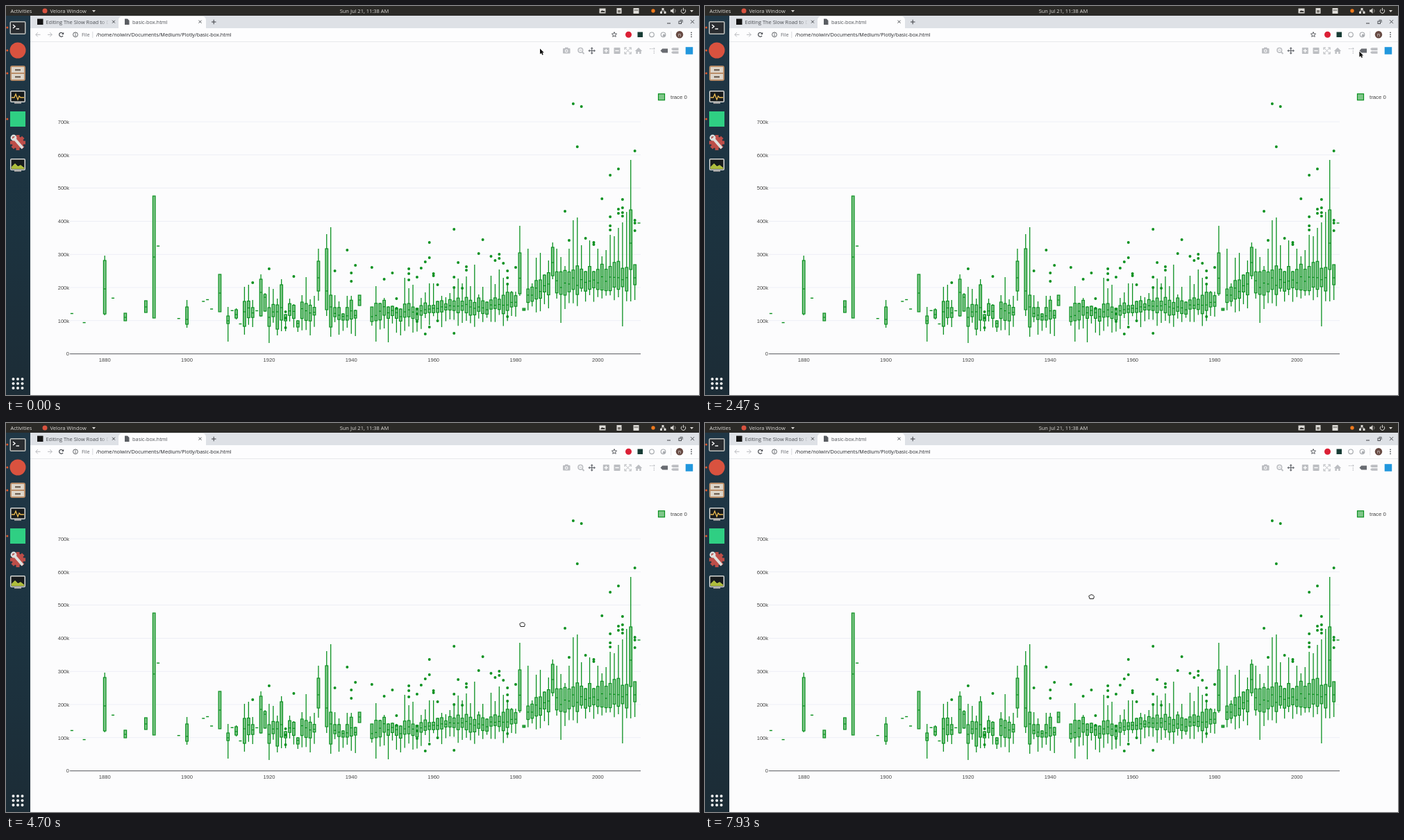
These frames come from a looping animation (998x561 px, 8 s). An HTML page with a canvas:

```html
<!DOCTYPE html>
<html lang="en">
<head>
<meta charset="utf-8">
<title>Box plot hover</title>
<style>
  html, body { margin: 0; width: 100%; height: 100%; overflow: hidden; background: #fcfcfd; }
  canvas { display: block; width: 998px; height: 561px; }
</style>
</head>
<body>
<canvas id="stage"></canvas>
<script>
const W = 998, H = 561, LOOP = 8000;
const GREEN = '#0b9120', PALE = '#7fc689';
const UI = '"Open Sans", "Noto Sans", sans-serif', PLOT = '"Liberation Sans", Arial, sans-serif';
const canvas = document.getElementById('stage');
const screenCtx = canvas.getContext('2d');
const ratio = window.devicePixelRatio || 1;
const backdrop = document.createElement('canvas');
for (const c of [canvas, backdrop]) { c.width = W * ratio; c.height = H * ratio; }
let g = backdrop.getContext('2d');
g.scale(ratio, ratio);
screenCtx.scale(ratio, ratio);

// ---- drawing helpers ----
function rect(x, y, w, h, color) { g.fillStyle = color; g.fillRect(x, y, w, h); }
function round(x, y, w, h, r, color) {
  g.fillStyle = color; g.beginPath(); g.roundRect(x, y, w, h, r); g.fill();
}
function frame(x, y, w, h, color, width = 1) {
  g.strokeStyle = color; g.lineWidth = width; g.strokeRect(x, y, w, h);
}
function dot(x, y, r, color) {
  g.fillStyle = color; g.beginPath(); g.arc(x, y, r, 0, 7); g.fill();
}
function ring(x, y, r, color, width = 1) {
  g.strokeStyle = color; g.lineWidth = width; g.beginPath(); g.arc(x, y, r, 0, 7); g.stroke();
}
function line(color, width, ...points) {
  g.strokeStyle = color; g.lineWidth = width; g.beginPath();
  for (let i = 0; i < points.length; i += 2) g.lineTo(points[i], points[i + 1]);
  g.stroke();
}
function poly(color, ...points) {
  g.fillStyle = color; g.beginPath();
  for (let i = 0; i < points.length; i += 2) g.lineTo(points[i], points[i + 1]);
  g.fill();
}
function text(str, x, y, size, color, font = UI, align = 'left', weight = '') {
  g.font = `${weight} ${size}px ${font}`;
  g.textAlign = align; g.fillStyle = color; g.fillText(str, x, y);
}
function cross(x, y, r, color) {
  line(color, 1, x - r, y - r, x + r, y + r);
  line(color, 1, x + r, y - r, x - r, y + r);
}
function interpolate(points, at) {
  let i = 1;
  while (i < points.length - 1 && points[i][0] < at) i++;
  const a = points[i - 1], b = points[i];
  const k = Math.min(1, Math.max(0, (at - a[0]) / (b[0] - a[0])));
  return a.slice(1).map((v, n) => v + (b[n + 1] - v) * k);
}
let seed = 11;
function random() { seed = (seed * 16807) % 2147483647; return seed / 2147483647; }

// ---- desktop and browser ----
function drawTopBar() {
  rect(0, 0, W, 14, '#2b2a27');
  const ink = '#dedcd8';
  text('Activities', 6.5, 10, 7.5, ink);
  dot(56, 7, 3.5, '#d9523f');
  text('Velora Window', 63.5, 10, 7.5, ink);
  poly(ink, 124, 6, 129, 6, 126.5, 9);
  text('Sun Jul 21, 11:38 AM', 516, 10, 7.5, ink, UI, 'center');
  rect(854.5, 3.5, 9, 7, ink);
  poly('#2b2a27', 856, 9, 858.5, 6, 860, 7.5, 861, 6.5, 863, 9);
  rect(879.5, 3, 7, 8, ink);
  rect(881, 6, 4, 3.5, '#77746e');
  rect(903.5, 3, 8, 8, ink);
  rect(904.5, 5.5, 6, 1, '#55524d');
  dot(932, 7, 2.7, '#f07a1c');
  rect(944.5, 3, 3, 3, ink); rect(942, 8, 3, 3, ink); rect(947.5, 8, 3, 3, ink);
  line(ink, 0.8, 943.5, 8, 943.5, 7, 949, 7, 949, 8);
  poly(ink, 957, 5.5, 959, 5.5, 961.5, 3, 961.5, 11, 959, 8.5, 957, 8.5);
  line('#96938d', 0.9, 963, 4.5, 964.3, 7, 963, 9.5);
  g.strokeStyle = ink; g.lineWidth = 1; g.beginPath(); g.arc(975.5, 7.3, 3.2, -0.9, 4.1); g.stroke();
  line(ink, 1, 975.5, 2.8, 975.5, 7);
  poly(ink, 985, 6, 990, 6, 987.5, 9);
}

function screenIcon(y, color, ...wave) {
  round(6, y - 9, 22, 17, 2, '#d8d9d6');
  rect(7.5, y - 7.5, 19, 14, '#171b1d');
  rect(12, y + 8, 10, 2, '#999');
  line(color, 1.3, ...wave.map((v, i) => i % 2 ? y + v : v));
}

function drawDock() {
  const shade = g.createLinearGradient(0, 14, 0, H);
  shade.addColorStop(0, '#203746');
  shade.addColorStop(0.55, '#1c3340');
  shade.addColorStop(1, '#1c2c36');
  rect(0, 14, 35, H - 14, shade);
  for (const y of [31, 64, 97, 163]) dot(1.8, y, 1.5, '#e1582b');

  round(5.5, 22, 23, 19, 2, '#bfc1be');
  rect(7, 23.5, 20, 16, '#292c30');
  line('#fff', 1.4, 10, 27, 13, 29.5, 10, 32);
  line('#fff', 1.4, 14.5, 33, 19, 33);

  dot(17, 64, 11.5, '#d9523f');

  round(6, 86, 22, 22, 3, '#b98d68');
  rect(8, 88, 18, 8, '#ded6ca'); rect(8, 98, 18, 8, '#ded6ca');
  rect(13, 91, 8, 2.5, '#77695c'); rect(13, 101, 8, 2.5, '#77695c');

  screenIcon(131, '#eabb52', 8, 1, 12, 1, 14, -4, 17, 4, 19, -1, 21, 1, 26, 1);
  rect(6, 152, 22, 22, '#2fcf83');

  for (let i = 0; i < 8; i++) {
    const a = i * Math.PI / 4;
    line('#bd4e49', 5, 17, 197, 17 + 11 * Math.cos(a), 197 + 11 * Math.sin(a));
  }
  dot(17, 197, 8.5, '#bd4e49');
  line('#dedfdd', 4, 11, 190, 24, 205);
  ring(11, 190, 3.2, '#dedfdd', 2.4);

  screenIcon(229, '#c6d14b', 8, 4, 13, -1, 17, 3, 21, 1, 26, 5);
  poly('#aebc3c', 8, 235, 8, 232, 13, 228, 17, 232, 21, 230, 26, 234, 26, 235);
  for (const x of [10.5, 17, 23.5]) for (const y of [538, 544.5, 551]) dot(x, y, 2, '#f1f2f2');
}

function drawBrowser() {
  rect(35, 14, W - 35, 18, '#dee1e6');
  round(162, 15, 126, 19, [5, 5, 0, 0], '#fdfdfe');
  rect(35, 32, W - 35, 19, '#fdfdfe');
  rect(35, 51, W - 35, 0.7, '#dfe1e5');
  const ink = '#4b4e53';

  rect(45, 18.5, 8.5, 8.5, '#151515');
  g.save();
  g.beginPath(); g.rect(56, 15, 92, 17); g.clip();
  const fade = g.createLinearGradient(136, 0, 148, 0);
  fade.addColorStop(0, ink);
  fade.addColorStop(1, '#dee1e6');
  text('Editing The Slow Road to Drawing', 57.5, 25.5, 7.4, fade);
  g.restore();
  cross(155, 22.7, 2, ink);
  poly('#5a5d62', 171, 18.5, 175, 18.5, 177.5, 21, 177.5, 27, 171, 27);
  text('basic-box.html', 182, 25.5, 7.4, ink);
  cross(279.5, 22.7, 2, ink);
  line(ink, 1.1, 296, 23, 302.5, 23);
  line(ink, 1.1, 299.2, 19.7, 299.2, 26.3);
  line(ink, 1.1, 952, 25, 957, 25);
  frame(969, 22, 3.5, 3.5, ink);
  line(ink, 0.9, 970.5, 20.3, 974.2, 20.3, 974.2, 24);
  cross(988.5, 22.7, 2.5, ink);

  for (const [x, way] of [[46, 1], [63, -1]]) {
    line('#b9bbbf', 1, x - 3, 41.3, x + 3.5, 41.3);
    line('#b9bbbf', 1, x + way * -0.2, 38.2, x - way * 3.2, 41.3, x + way * -0.2, 44.4);
  }
  g.strokeStyle = ink; g.lineWidth = 1.2; g.beginPath(); g.arc(79.5, 41.3, 2.9, 0.5, 5.6); g.stroke();
  poly(ink, 83.2, 37.8, 83.2, 41, 80, 41);
  ring(100, 41.3, 3.4, ink, 0.9);
  rect(99.5, 40.8, 1, 2.4, ink); rect(99.5, 39, 1, 1, ink);
  text('File', 109, 44, 7.3, '#66696e');
  rect(124.5, 37, 0.7, 9, '#c9cbcf');
  text('/home/nolwin/Documents/Medium/Plotly/basic-box.html', 130, 44, 7.3, '#222428');

  const star = [];
  for (let i = 0; i < 11; i++) {
    const a = -Math.PI / 2 + i * Math.PI / 5, r = i % 2 ? 1.7 : 3.8;
    star.push(876 + r * Math.cos(a), 41.3 + r * Math.sin(a));
  }
  line(ink, 0.9, ...star);
  dot(896.5, 41.3, 4.5, '#db1f35');
  rect(909.5, 37.5, 7.5, 7.5, '#173c35');
  ring(930, 41.3, 3.3, '#a7aaae', 1.2);
  ring(946.5, 41.3, 3.3, '#a7aaae', 1.2);
  dot(947.5, 42.3, 1.7, '#a7aaae');
  rect(957.5, 36.5, 0.7, 10, '#d5d7da');
  dot(970, 41.3, 5.2, '#674a43');
  text('n', 970, 43.6, 6.5, '#fff', UI, 'center');
  for (const y of [38.3, 41.3, 44.3]) dot(987, y, 0.9, ink);
}

function drawModebar() {
  const soft = '#bcbec2', dark = '#686b71', paper = '#fcfcfd';
  round(802, 61, 10.5, 7.5, 1, soft); rect(805, 59.7, 4.5, 2, soft);
  dot(807.2, 64.8, 2.3, paper); dot(807.2, 64.8, 1.3, soft);
  ring(827.3, 63.8, 3.3, soft, 1.6); line(soft, 1.8, 829.5, 66, 832.5, 69);
  rect(825.7, 63.3, 3.2, 1, soft);
  line(dark, 1.2, 839.5, 64.5, 848, 64.5); line(dark, 1.2, 843.7, 60, 843.7, 69);
  for (let i = 0; i < 4; i++) {
    g.save(); g.translate(843.7, 64.5); g.rotate(i * Math.PI / 2);
    poly(dark, 5.3, 0, 3, -2, 3, 2); g.restore();
  }
  for (const x of [864.3, 880]) {
    round(x - 4.5, 60, 9, 9, 0.8, soft);
    rect(x - 2.7, 63.8, 5.4, 1.4, paper);
  }
  rect(863.6, 61.8, 1.4, 5.4, paper);
  cross(895.6, 64.5, 3.2, soft);
  for (const sx of [-1, 1]) for (const sy of [-1, 1]) {
    const x = 895.6 + sx * 4.5, y = 64.5 + sy * 4.3;
    line(soft, 1.3, x - sx * 2.8, y, x, y, x, y - sy * 2.8);
  }
  poly(soft, 905.8, 65, 911, 60, 916.2, 65, 914.6, 65, 914.6, 69, 912.2, 69, 912.2, 66, 909.8, 66, 909.8, 69, 907.4, 69, 907.4, 65);
  for (const x of [927, 929.7]) rect(x, 61, 1.5, 1.2, soft);
  rect(932.3, 60.5, 2, 2, soft);
  for (const y of [64.3, 67]) rect(932.7, y, 1.2, 1.6, soft);
  poly(dark, 942.5, 64.5, 945.3, 61.5, 953, 61.5, 953, 67.5, 945.3, 67.5);
  for (const y of [60.3, 65.2]) poly(soft, 958, y + 1.8, 960, y, 968.5, y, 968.5, y + 3.6, 960, y + 3.6);
  rect(978.7, 59.2, 10.5, 10.5, '#2197dd');
}

// ---- box plot: values are heights on the stage ----
const yearX = year => 142.2 + (year - 1880) * 5.918;
const singles = { 1872: 443.5, 1875: 456.6, 1882: 421.3, 1893: 346.2, 1898: 450.7, 1904: 426,
  1905: 423.5, 1906: 437, 1911: 439.3, 1913: 458.5, 1917: 439.5, 2010: 313 };
// year: upper whisker, q3, median, q1, lower whisker
const boxes = {
  1880: [360, 367, 408, 444, 446], 1885: [443, 443, 449, 454, 454], 1890: [425, 425, 434, 442, 442],
  1892: [274, 274, 362, 450, 450], 1900: [424, 434, 452, 459, 464], 1908: [387, 387, 414, 441, 441],
  1910: [434, 447, 454, 458, 484], 1912: [436, 438, 445, 450, 452], 1914: [405, 426, 441, 462, 474],
  1918: [387, 394, 413, 447, 448], 1919: [414, 416, 420, 440, 441], 1920: [405, 435, 449, 462, 486],
  1922: [422, 431, 441, 466, 475], 1923: [394, 402, 435, 453, 469], 1932: [350, 368, 392, 411, 425],
  1934: [329, 350, 411, 438, 447], 1935: [319, 417, 434, 463, 477], 1942: [417, 417, 424, 432, 432],
  1945: [434, 434, 448, 455, 461], 1981: [317, 356, 392.5, 415, 418], 1982: [436, 436, 438, 439, 439],
  1989: [341, 348, 370, 389, 394], 2008: [222, 294, 342, 380, 426], 2009: [373, 373, 392, 402, 424]
};
// upper whiskers of consecutive years; the boxes below them follow the trend
const peaks = {
  1915: [402, 424], 1921: [408], 1924: [444, 422, 430, 453, 417, 391, 423, 418],
  1936: [417, 426, 443, 418, 418, 438],
  1946: [404, 428, 421, 433, 432, 435, 436, 392, 407, 402, 435, 421, 413, 400, 400, 425, 418, 420,
    414, 406, 393, 400, 390, 404, 373, 416, 405, 426, 389, 401, 380, 392, 401, 411, 412],
  1983: [350, 400, 363, 356, 387, 367],
  1990: [350, 362, 375, 350, 309, 305, 345, 382, 338, 382, 350, 361, 352, 330, 332, 320, 312, 297]
};
const lows = { 1927: 470, 1930: 475, 1941: 476, 1946: 484, 1949: 485, 1952: 475, 1991: 457, 2006: 462 };
const trend = [[1915, 431, 450], [1955, 429, 450], [1962, 427, 440], [1972, 423, 443],
  [1980, 414, 437], [1987, 391, 415], [1994, 377, 412], [2007, 373, 408]];
const outliers = {
  1916: [399], 1920: [379], 1924: [441, 450, 464], 1926: [390], 1936: [382], 1939: [352],
  1940: [385, 397], 1941: [374], 1945: [377], 1948: [394], 1950: [385], 1951: [422, 436],
  1954: [379, 386, 395], 1956: [391, 437, 444, 455], 1957: [378], 1958: [369, 473],
  1959: [341, 363, 463], 1960: [386, 389], 1961: [402, 454], 1965: [322, 391, 406, 472],
  1966: [370], 1967: [407], 1968: [376, 381], 1971: [357], 1972: [337], 1974: [361], 1975: [367],
  1976: [358, 364], 1977: [371], 1978: [382, 392, 401, 448], 1980: [377], 1992: [296], 1993: [338],
  1994: [141], 1995: [203], 1996: [145], 1997: [335], 1999: [341, 344], 2001: [278],
  2003: [244, 304, 317, 323], 2005: [235, 293, 299], 2006: [279, 291, 298, 303],
  2009: [209, 309, 313, 324]
};

function trendBox(year, top) {
  const [upper, lower] = interpolate(trend, year);
  const q3 = Math.max(top + 1, upper + (random() - 0.5) * 11);
  const q1 = Math.max(q3 + 9, lower + (random() - 0.5) * 9);
  const low = lows[year] || q1 + 5 + random() * 17;
  return [top, q3, q3 + (q1 - q3) * (0.4 + random() * 0.3), q1, low];
}

function drawBox(year, [top, q3, median, q1, low]) {
  const x = yearX(year);
  line(GREEN, 1.3, x, top, x, low);
  rect(x - 1.8, q3, 3.6, q1 - q3, PALE);
  frame(x - 1.8, q3, 3.6, q1 - q3, GREEN, 1.2);
  line(GREEN, 1.2, x - 1.8, median, x + 1.8, median);
}

function drawChart() {
  for (let i = 0; i < 8; i++) {
    const y = 501.6 - i * 47.8;
    rect(92, y - 0.4, 822, i ? 0.8 : 1, i ? '#e9ebf4' : '#55575c');
    text(i ? i + '00k' : '0', 91, y + 2.7, 7.5, '#444', PLOT, 'right');
  }
  for (let year = 1880; year <= 2000; year += 20)
    text(year, yearX(year), 512.8, 7.6, '#444', PLOT, 'center');
  for (const year in singles) rect(yearX(year) - 2, singles[year] - 0.7, 4, 1.4, GREEN);
  for (const year in boxes) drawBox(+year, boxes[year]);
  for (const first in peaks)
    peaks[first].forEach((top, i) => drawBox(+first + i, trendBox(+first + i, top)));
  for (const year in outliers) for (const y of outliers[year]) dot(yearX(year), y, 2, GREEN);
  rect(939.5, 126.7, 9, 9, PALE);
  frame(939.5, 126.7, 9, 9, GREEN, 1.2);
  text('trace 0', 957, 134, 7.8, '#444', PLOT);
}

// ---- moving parts ----
const hoverLabels = [['max: 385k', 317.5, 317.5], ['q3: 304.75k', 356, 356],
  ['median: 228k', 392.8, 392.8], ['q1: 181.05k', 410, 415], ['min: 175.5k', 423, 417.7]];

function drawHover() {
  for (const [value, y, anchor] of hoverLabels) {
    const label = `(1981, ${value})`;
    g.font = `8.3px ${PLOT}`;
    const right = 750 + g.measureText(label).width;
    g.beginPath();
    for (const [px, py] of [[741, anchor], [745.5, y - 3], [745.5, y - 6.4], [right, y - 6.4],
      [right, y + 6.4], [745.5, y + 6.4], [745.5, y + 3]]) g.lineTo(px, py);
    g.closePath();
    g.fillStyle = GREEN; g.fill();
    g.strokeStyle = '#fff'; g.lineWidth = 0.5; g.stroke();
    text(label, 747.7, y + 2.9, 8.3, '#fff', PLOT);
  }
}

// time, x, y
const path = [[0, 769, 61.5], [100, 769, 61.5], [900, 840, 64], [1100, 843, 65], [1300, 843, 65],
  [1430, 845, 66], [1600, 846, 66], [1770, 848, 67.5], [2370, 940, 66], [2630, 946, 65],
  [2870, 949, 65.5], [3230, 949, 65.5], [3500, 940, 76], [3700, 922, 100], [4500, 762, 278],
  [4700, 743.5, 290.5], [5430, 741, 320.5], [7230, 741, 320.5], [7930, 556.5, 250.5], [LOOP, 556.5, 250.5]];

function drawCursor(x, y) {
  g.save();
  g.translate(x, y);
  g.lineJoin = 'round';
  const inPlot = y > 110 && x < 915;
  const shape = new Path2D(inPlot
    ? 'M-3.7 -.8Q-3.5 -2 -2.2 -1.8Q-1.8 -3 -.6 -2.6Q.6 -3.4 1.3 -2.4Q2.6 -2.7 2.9 -1.5Q4.2 -1 3.7 .5L3 3H-2.5Z'
    : 'M0 0V8L1.9 6.3L3.3 9.2L4.7 8.5L3.4 5.8H5.8Z');
  g.fillStyle = inPlot ? '#fff' : '#111';
  g.strokeStyle = inPlot ? '#222' : '#fff';
  g.lineWidth = inPlot ? 1 : 1.3;
  if (inPlot) { g.fill(shape); g.stroke(shape); }
  else { g.stroke(shape); g.fill(shape); }
  g.restore();
}

rect(0, 0, W, H, '#fcfcfd');
drawTopBar();
drawDock();
drawBrowser();
drawModebar();
drawChart();
g = screenCtx;

function render(now) {
  const t = now % LOOP;
  g.drawImage(backdrop, 0, 0, W, H);
  if (t >= 5300 && t < 7300) drawHover();
  drawCursor(...interpolate(path, t));
  requestAnimationFrame(render);
}
requestAnimationFrame(render);
</script>
</body>
</html>
```
